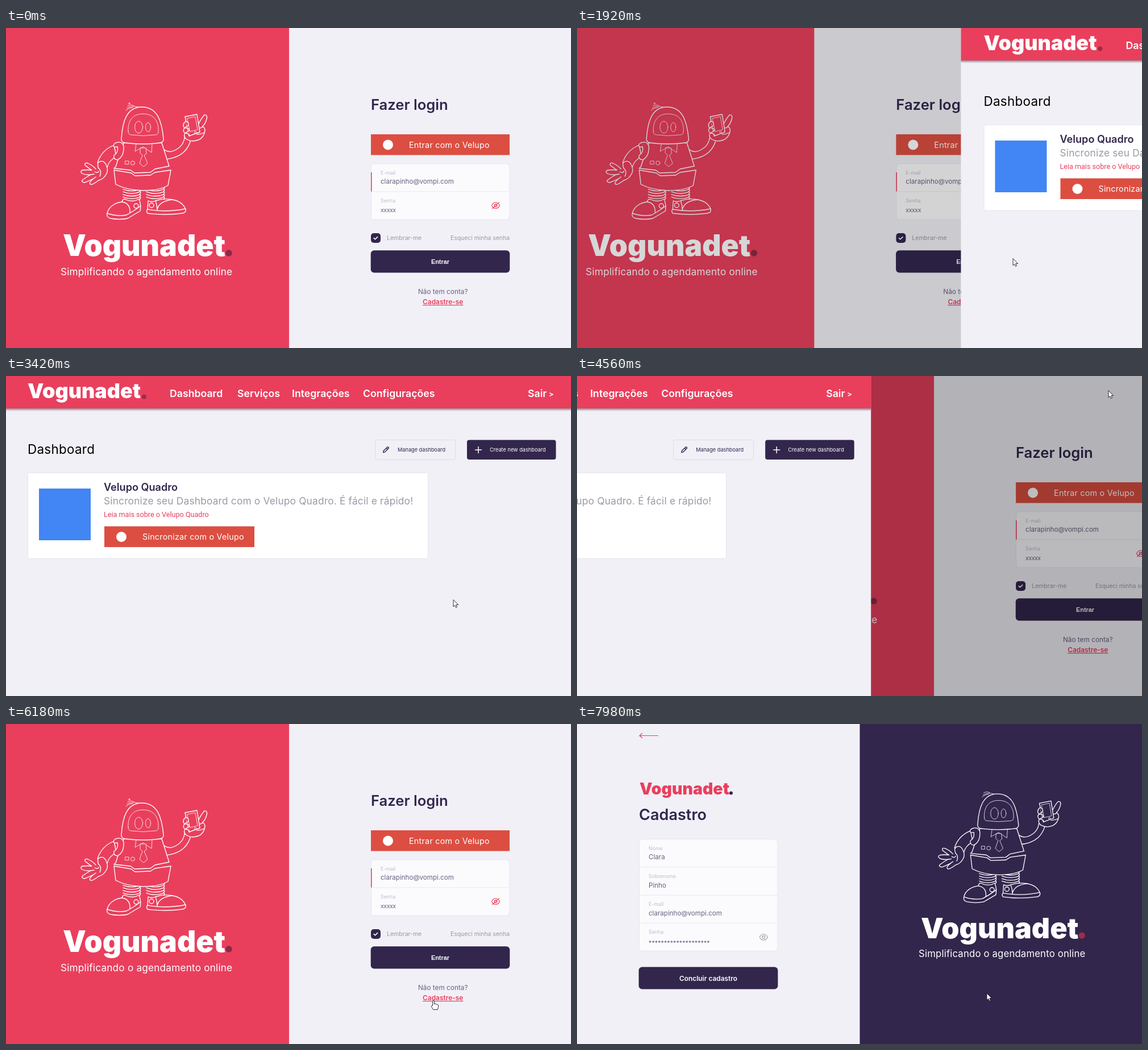
An HTML page for the animation above (8 s loop, 994 by 563 pixels).

```html
<!DOCTYPE html>
<html lang="pt-BR">
<head>
<meta charset="utf-8">
<title>Vogunadet</title>
<style>
  html, body { margin: 0; width: 100%; height: 100%; overflow: hidden; background: #f1f0f7; }
  svg { display: block; width: 994px; height: 563px; }
  text { font-family: Inter, "Open Sans", sans-serif; white-space: pre; }
  .robot { stroke-linejoin: round; stroke-linecap: round; stroke-width: 1.35; stroke: #fff; }
  .robot .thin { stroke-width: .8; }
</style>
</head>
<body>
<svg id="stage" viewBox="0 0 994 563" xmlns="http://www.w3.org/2000/svg"></svg>
<script>
const RED = '#e93f5d', NAVY = '#32264d', PAPER = '#f1f0f7', BRICK = '#dc4e41',
      BODY = '#6a6180', MUTED = '#9c98a6', HINT = '#c1bccc', LINE = '#e6e6f0', FIELD = '#fbfbfd';
const BRAND = 'Vogunadet', SERVICE = 'Velupo', PRODUCT = 'Velupo Quadro', MAIL = 'clarapinho@vompi.com';

// Drawing helpers
const text = (x, y, str, size, fill, weight = 400, extra = '') =>
  `<text x="${x}" y="${y}" font-size="${size}" fill="${fill}" font-weight="${weight}" ${extra}>${str}</text>`;
const mid = (x, y, str, size, fill, weight, extra = '') =>
  text(x, y, str, size, fill, weight, 'text-anchor="middle" ' + extra);
const rect = (x, y, w, h, fill, rx = 0, extra = '') =>
  `<rect x="${x}" y="${y}" width="${w}" height="${h}" fill="${fill}" rx="${rx}" ${extra}/>`;
const circle = (x, y, r, fill, extra = '') => `<circle cx="${x}" cy="${y}" r="${r}" fill="${fill}" ${extra}/>`;
const path = (d, fill = 'none', extra = '') => `<path d="${d}" fill="${fill}" ${extra}/>`;
const stroke = (color, width) => `stroke="${color}" stroke-width="${width}" stroke-linecap="round" stroke-linejoin="round"`;
const spaced = px => `letter-spacing="${px}"`;
const group = (id, body) => `<g id="${id}">${body}</g>`;

const serviceButton = (x, y, w, textX, label) =>
  rect(x, y, w, 36.5, BRICK) + circle(x + 30, y + 18.5, 9, '#fff') +
  text(textX, y + 23.5, label, 14.3, '#fff', 400, spaced(.25));

const field = (x, y, label, value) =>
  text(x, y, label, 8.8, HINT) + text(x, y + 16.8, value, 11.6, BODY);

const fieldBox = (x, y, w, rows) => {
  let out = rect(x, y, w, rows * 49.2, FIELD, 6, `stroke="${LINE}"`);
  for (let i = 1; i < rows; i++) out += path(`M${x} ${y + i * 49.2}h${w}`, 'none', `stroke="${LINE}"`);
  return out;
};

const eye = (x, y, color, off) => `<g transform="translate(${x} ${y})" ${stroke(color, 1.1)}>` +
  path('M-7 0C-4-7 4-7 7 0C4 7-4 7-7 0Z') + circle(0, 0, 2.4, 'none') +
  (off ? path('M-6 5.5L6-5.5') : '') + '</g>';

function spring(x, y, w) {
  let out = '';
  for (let i = 0; i < 5; i++) out += path(`M${x} ${y + i * 4.6}q${w / 2} 6 ${w} 0q2 2-1 4`);
  return out;
}

function robot(bg, tip) {
  const thin = 'class="thin"';
  return `<g class="robot">` +
    // antenna
    path('M214 137q6-3 11 0M213 141q8-5 19-2M211 145q5-5 12-5', 'none', thin) +
    (tip ? circle(217, 132.7, 1.2, 'none', thin) : '') +
    // right arm, hand and phone
    path('M272 209Q284 221 295 216Q312 209 314 193L325 197Q322 209 313 218Q300 230 277 231Z', bg) +
    path('M338 170Q344 158 349 153Q355 152 353 160Q351 168 346 173Q352 177 349 185Q346 194 338 197Q328 201 318 196Q311 191 315 185Q310 181 314 176Q309 170 316 164Z', bg) +
    path('M315 156L336 152L341 183L322 190Z', bg) +
    path('M319 159L333 156L337 179L324 182Z', 'none', thin) +
    circle(333, 183.5, 1.6, 'none', thin) +
    path('M316 164Q322 165 321 171L314 176Q323 175 322 181L315 185Q322 185 323 190', bg) +
    path('M341 176Q346 175 346 173M336 187Q343 187 349 184') +
    // left arm and hand
    path('M190 206Q168 215 161 237L178 245Q181 233 194 226Z', bg) +
    path('M163 247Q159 238 165 235Q173 232 177 243Q180 250 177 256Q172 266 163 268Q158 272 152 275Q146 276 148 271Q150 268 154 265Q146 269 138 272Q131 271 135 267Q142 262 149 258Q140 259 134 256Q129 252 135 250Q143 249 151 250Q143 245 139 241Q138 236 144 238Q153 242 158 248', bg) +
    path('M163 247Q169 252 165 261M149 258L155 257M154 265L158 262M156 253Q162 256 163 252') +
    // legs
    spring(206, 279, 30) + spring(247, 279, 31) +
    // shoes
    path('M178 326C181 313 194 307 204 306Q205 301 209 301Q222 308 234 301Q238 311 236 322Q224 329 214 335Q200 338 184 335Q176 333 178 326Z', bg) +
    path('M178 326Q195 332 212 329Q225 322 237 313M204 306Q219 308 218 325') + circle(229, 313, 4, bg) +
    path('M250 304Q256 307 263 304C277 299 308 298 316 319Q317 325 310 326Q280 330 249 326Q246 322 249 319Z', bg) +
    path('M249 319Q282 325 316 318M263 304Q266 312 266 320M266 319C269 308 280 303 294 302') + circle(256, 312, 4, bg) +
    // trousers and vest
    path('M190 250L193 275Q212 285 240 286Q270 286 285 277L290 250L262 254L254 259L227 260L220 255Z', bg) +
    path('M207 202L193 244L190 247L219 250L226 255L254 254L262 248L287 243L274 202Z', bg) +
    path('M229 204L227 217L241 209L256 219L257 204', bg, thin) +
    path('M237 211L246 211L247 221L243 224L249 238L242 244L235 238L240 224L236 220Z', bg, thin) +
    rect(210, 234, 6, 5.5, 'none', 0, thin) + circle(223, 237.5, 3.5, 'none', thin) +
    // shoulder
    path('M193 202Q204 198 207 208Q208 226 196 232Q188 231 190 224Q198 219 196 209Q192 210 189 208Q189 204 193 202Z', bg) +
    // head
    path('M203 194C205 165 212 139 239 139C267 139 274 165 277 194Q278 201 271 202Q240 206 209 202Q202 201 203 194Z', bg) +
    path('M215 182C214 164 222 151 241 151C260 151 269 164 268 182Q268 188 262 188Q241 191 221 188Q215 188 215 182Z', 'none', thin) +
    `<ellipse cx="233.5" cy="174.5" rx="7" ry="10.5" fill="none" ${thin}/>` +
    `<ellipse cx="250" cy="174.5" rx="4.5" ry="8" fill="none" ${thin}/></g>`;
}

const hero = (bg, dot, tip) => robot(bg, tip) +
  text(100, 401, BRAND, 51.6, '#fff', 900) + circle(392, 396, 5.8, dot) +
  text(96, 435, 'Simplificando o agendamento online', 17.2, '#fff', 400, spaced(.2));

// Pages
const login = rect(-2, 0, 999, 563, PAPER) + rect(-2, 0, 500, 563, RED) + hero(RED, '#8d2a48', true) +
  text(642, 144, 'Fazer login', 25.6, NAVY, 600) +
  serviceButton(642, 187, 244, 709, 'Entrar com o ' + SERVICE) +
  fieldBox(642.5, 238.7, 243.5, 2) + rect(642, 254, 1.6, 33.5, RED) +
  field(659, 257.5, 'E-mail', MAIL) +
  text(659, 307, 'Senha', 8.8, HINT) + text(659, 324, 'xxxxx', 10.5, BODY, 400, spaced(-.4)) +
  eye(861.5, 312.3, RED, true) +
  rect(642, 361, 17, 17, NAVY, 5) + path('M647.2 369.6l2.2 2.2 4.2-4.2', 'none', stroke('#fff', 1.6)) +
  text(670, 373, 'Lembrar-me', 10.5, MUTED) +
  text(886, 373, 'Esqueci minha senha', 10.4, MUTED, 400, 'text-anchor="end"') +
  rect(641.7, 391.2, 244.6, 39.2, NAVY, 6) +
  mid(764, 415, 'Entrar', 10.9, '#fff', 700, `style="font-family:'Liberation Sans',Arial,sans-serif"`) +
  mid(768.7, 468, 'Não tem conta?', 11.8, BODY) +
  mid(768.7, 486, 'Cadastre-se', 11.9, RED, 600, 'text-decoration="underline"') +
  rect(-2, 0, 999, 563, '#000', 0, 'id="dim"');

const nav = [[288, 'Dashboard'], [407, 'Serviços'], [503, 'Integrações'], [628, 'Configurações'], [918, 'Sair']];
const dash = rect(-2, 0, 999, 563, PAPER) +
  rect(-2, 57, 999, 5, 'url(#shade)') + rect(-2, 0, 999, 57, RED) +
  text(38, 39, BRAND, 35.9, '#fff', 900) + circle(243, 36.5, 4, '#9e2a48') +
  nav.map(([x, label]) => text(x, 37, label, 17.7, '#fff', 600)).join('') +
  text(955, 35.5, '&gt;', 12.5, '#fff', 700) +
  text(38, 137, 'Dashboard', 22.4, '#000', 400, spaced(.3)) +
  rect(649.5, 112.5, 141, 34.5, 'none', 3, 'stroke="#dcdce8"') +
  path('M663.7 134.6l.6-3 6.4-6.4q1-.8 2 .2 1.2 1 .2 2l-6.4 6.4ZM669.2 126.7l2.3 2.3', 'none', stroke(NAVY, 1.4)) +
  text(689, 132.7, 'Manage dashboard', 9.2, NAVY) +
  rect(811, 112.5, 156.5, 34.5, NAVY, 4) + path('M825.5 130h11M831 124.5v11', 'none', stroke('#fff', 1.5)) +
  text(851, 132.7, 'Create new dashboard', 9.2, '#fff') +
  rect(38.5, 170.5, 704, 150.5, '#fff', 2, `stroke="${LINE}"`) +
  rect(58, 198, 91, 91, '#4285f4') +
  text(172, 202, PRODUCT, 18.1, NAVY, 600) +
  text(172, 226, `Sincronize seu Dashboard com o ${PRODUCT}. É fácil e rápido!`, 17.3, MUTED, 400, spaced(.2)) +
  text(172, 248, 'Leia mais sobre o ' + PRODUCT, 12.6, RED, 400, 'style="font-family:Roboto,sans-serif"') +
  serviceButton(173, 264.5, 264, 240, 'Sincronizar com o ' + SERVICE);

const signup = rect(-2, 0, 999, 563, PAPER) + rect(497.5, 0, 499.5, 563, NAVY) +
  path('M110 20.5H142.5M114.5 16.5L110 20.5L114.5 24.5', 'none', stroke(RED, 1.2)) +
  text(110, 123.5, BRAND, 28.5, RED, 900) + circle(271, 121.5, 3, NAVY) +
  text(109, 169, 'Cadastro', 27.1, NAVY, 600) +
  fieldBox(109.5, 202.7, 243.5, 4) +
  field(126, 221.5, 'Nome', 'Clara') + field(126, 270.7, 'Sobrenome', 'Pinho') +
  field(126, 320, 'E-mail', MAIL) +
  text(126, 369.3, 'Senha', 8.8, HINT) + text(126, 388.5, '*'.repeat(20), 10.35, BODY, 500) +
  eye(328.3, 375, MUTED) +
  rect(108.6, 427.6, 244.8, 39, NAVY, 6) + mid(231, 452, 'Concluir cadastro', 11.9, '#fff', 600) +
  `<g transform="translate(508 -12) scale(.97)">${hero(NAVY, '#a32b45', false)}</g>`;

const outline = stroke('#1c1a22', .9);
const pointer =
  path('M0 0V11.8L2.7 9.3L4.5 13.4L6.5 12.5L4.8 8.5H8.3Z', '#fff', 'id="arrow" ' + outline) +
  path('M-1.4 9.5V1.6Q-1.4 .4 0 .4Q1.4 .4 1.4 1.6V6.6Q3.5 5.7 4.1 7.1Q5.9 6.3 6.4 7.8Q8.5 7.4 8.5 9.2V12.5L7.2 16.5H-.3L-3.4 11.6Q-4.1 9.8-2.8 9.2Z',
    '#fff', 'id="hand" ' + outline);

const $ = id => document.getElementById(id);
$('stage').innerHTML =
  '<defs><linearGradient id="shade" x2="0" y2="1"><stop stop-color="#96888f"/><stop offset="1" stop-color="#f1f0f7"/></linearGradient></defs>' +
  group('login', login) + group('dash', dash) + group('signup', signup) + group('cursor', pointer);

// Timeline
const LOOP = 8000, TICK = 60, SLIDE = 300, WIDTH = 1000, DRIFT = 250;
const ENTER = 1857, LEAVE = 4462, JOIN = 6651;

const track = [
  [240, 986, 65], [420, 962, 180], [600, 928, 282], [780, 895, 350], [1020, 855, 394],
  [1260, 800, 404], [1500, 767, 406], [3360, 767, 406], [3420, 787, 394], [3600, 880, 270],
  [3780, 962, 130], [3900, 985, 62], [4020, 965, 26], [4110, 945, 21], [4200, 936, 24],
  [4260, 935, 26], [4860, 935, 26], [5280, 862, 53], [5460, 790, 150], [5700, 716, 320],
  [5880, 722, 430], [6120, 748, 486], [6180, 752, 486], [6300, 752, 486], [6420, 756, 482],
  [7560, 756, 482], [7680, 748, 481], [7860, 730, 477], [7980, 721, 474]
];

// Clickable areas: from, until, left, top, right, bottom
const links = [
  [0, ENTER, 642, 395, 886, 430],
  [ENTER + SLIDE, LEAVE, 915, 20, 965, 42],
  [LEAVE + SLIDE, JOIN, 642, 391, 886, 430],
  [LEAVE + SLIDE, JOIN, 733, 475, 805, 490]
];

// cubic-bezier(0, 0, .58, 1)
function easeOut(x) {
  if (x <= 0) return 0;
  if (x >= 1) return 1;
  let lo = 0, hi = 1;
  for (let i = 0; i < 24; i++) {
    const s = (lo + hi) / 2;
    if (1.74 * s * s - .74 * s ** 3 < x) lo = s; else hi = s;
  }
  return 3 * lo * lo - 2 * lo ** 3;
}

function cursorAt(t) {
  const i = track.findIndex(k => k[0] >= t);
  if (i < 0) return track[track.length - 1].slice(1);
  if (i === 0) return track[0].slice(1);
  const [t0, x0, y0] = track[i - 1], [t1, x1, y1] = track[i], f = (t - t0) / (t1 - t0);
  return [x0 + (x1 - x0) * f, y0 + (y1 - y0) * f];
}

const move = (id, x, y = 0) => $(id).setAttribute('transform', `translate(${x} ${y})`);
const show = (id, on) => $(id).setAttribute('display', on ? 'inline' : 'none');

function draw(t) {
  const [enter, leave, join] = [ENTER, LEAVE, JOIN].map(at => easeOut((t - at) / SLIDE));
  const returning = t >= LEAVE && t < JOIN;
  const covered = t < LEAVE ? enter : returning ? 1 - leave : join;
  move('login', (returning ? DRIFT : -DRIFT) * covered);
  $('dim').setAttribute('opacity', covered / 2);
  move('dash', WIDTH * (1 - enter - leave));
  show('dash', enter > 0 && leave < 1);
  move('signup', WIDTH * (1 - join));
  show('signup', join > 0);

  const [x, y] = cursorAt(t);
  const hot = links.some(([from, to, l, top, r, b]) =>
    t >= from && t < to && x >= l && x <= r && y >= top && y <= b);
  move('cursor', x, y);
  show('cursor', t >= track[0][0]);
  show('hand', hot);
  show('arrow', !hot);
}

const start = performance.now();
function loop() {
  const t = Math.max(0, performance.now() - start) % LOOP;
  draw(Math.floor(t / TICK) * TICK);
  requestAnimationFrame(loop);
}
draw(0);
requestAnimationFrame(loop);
</script>
</body>
</html>
```
